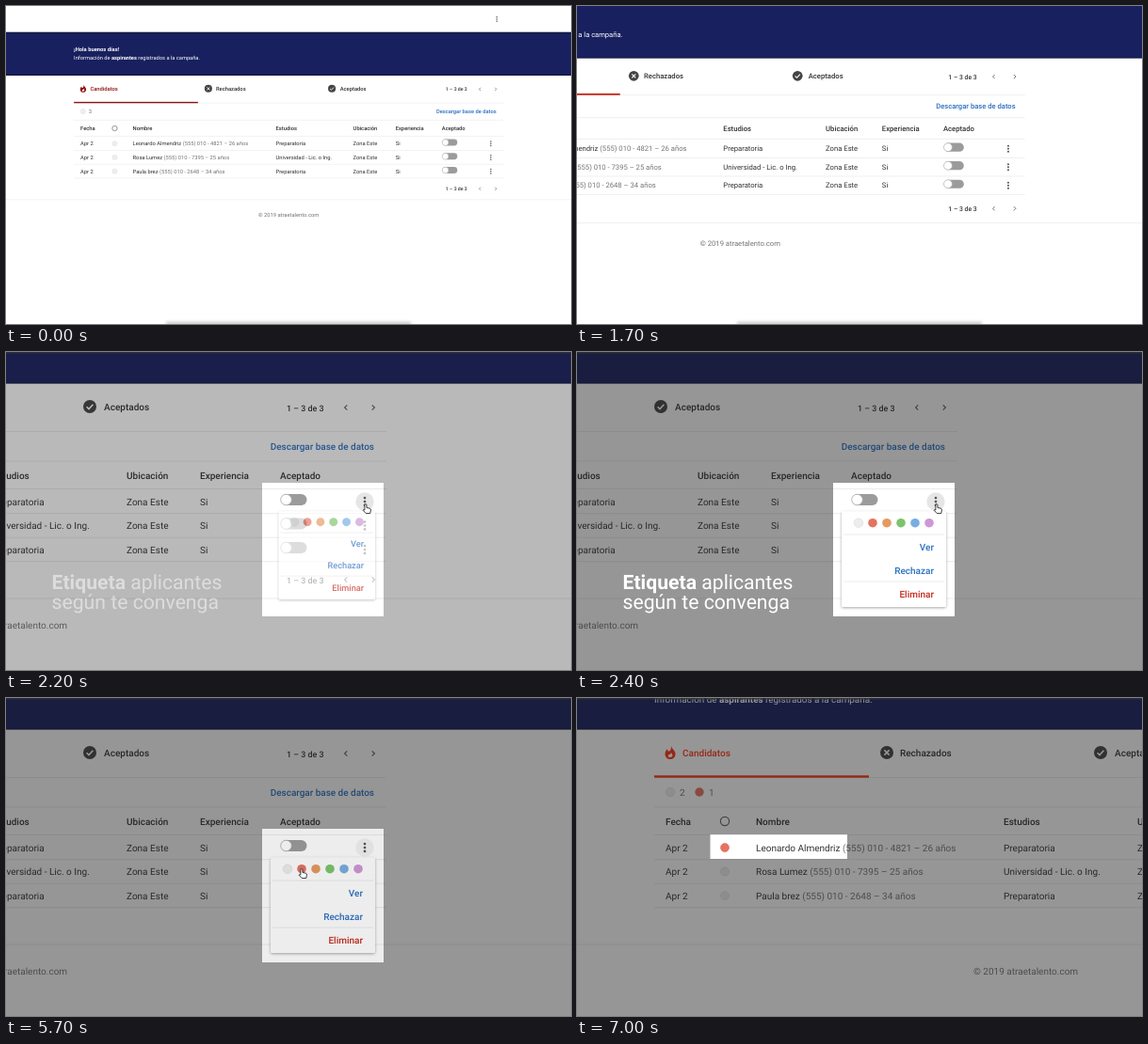
Recreate the animation shown at these times as an HTML page. Size 600 px wide and 338 px high, loop 8 s.

```html
<!DOCTYPE html>
<html lang="es">
<head>
<meta charset="utf-8">
<title>Etiqueta aplicantes</title>
<style>
  html, body { margin: 0; width: 100%; height: 100%; overflow: hidden; background: #fff; }
  svg { display: block; width: 100vw; height: 100vh; font: 10px Roboto, Arial, sans-serif; fill: #333; --red: #c4281b; }
  text { white-space: pre; text-rendering: geometricPrecision; }
  .m { font-weight: 500; }
  .b { font-weight: 700; }
  .soft { fill: #757575; }
  .link { fill: #2a6fc0; }
  .red { fill: var(--red); }
  .line { stroke: #ebebeb; stroke-width: 1; }
  .stroke { fill: none; stroke: #666; stroke-width: 1.2; }
  .blank { fill: #eee; stroke: #dcdcdc; stroke-width: .7; }
</style>
</head>
<body>
<svg id="stage" viewBox="0 0 600 338" xmlns="http://www.w3.org/2000/svg"></svg>
<script>
const LOOP = 8000, STEP = 100, DIM = 0.46, CORAL = '#e57360';
const stage = document.getElementById('stage');

// Markup helpers; the page uses the coordinates of the fully zoomed view.
const text = (x, y, s, cls = '', extra = '') =>
  `<text x="${x}" y="${y + 3.5}" class="${cls}" ${extra}>${s}</text>`;
const line = (y, x1 = 82, x2 = 871) => `<line class="line" x1="${x1}" x2="${x2}" y1="${y}" y2="${y}"/>`;
const circle = (x, y, r, attrs = '') => `<circle cx="${x}" cy="${y}" r="${r}" ${attrs}/>`;
const kebab = (x, y) => [-3.9, 0, 3.9].map(d => circle(x, y + d, 1.35, 'fill="#555"')).join('');
const chevron = (x, y, dir) =>
  `<path class="stroke" d="M${x - dir * 1.3},${y - 2.7}l${dir * 2.7},2.7l${-dir * 2.7},2.7"/>`;
const pager = y => text(765, y, '1 – 3 de 3', 'm', 'font-size="8.9"') + chevron(828, y, -1) + chevron(857, y, 1);
const badge = (x, mark) => circle(x, 58, 7, 'fill="#444"') +
  `<path d="M${x},58${mark}" fill="none" stroke="#fff" stroke-width="1.5"/>`;
const toggle = y => `<rect x="759" y="${y - 6}" width="27.5" height="12" rx="6" fill="#9b9b9b"/>` +
  circle(764.5, y, 5.8, 'fill="#fff" stroke="#a8a8a8" stroke-width=".8"');

const people = [
  { name: 'Leonardo Almendriz', info: '(555) 010 - 4821 – 26 años', studies: 'Preparatoria' },
  { name: 'Rosa Lumez', info: '(555) 010 - 7395 – 25 años', studies: 'Universidad - Lic. o Ing.' },
  { name: 'Paula brez', info: '(555) 010 - 2648 – 34 años', studies: 'Preparatoria' }
];

const row = (p, i) => {
  const y = 159 + i * 25.5;
  return text(94, y, 'Apr 2') + circle(157, y, 4.5, `class="blank" id="tag${i}"`) +
    text(190, y, `${p.name} <tspan class="soft">${p.info}</tspan>`) + text(453, y, p.studies) +
    text(595, y, 'Zona Este') + text(673, y, 'Si') + toggle(y - 2) +
    (i ? '' : circle(848, y, 9.7, 'id="hover" fill="#e6e6e6"')) + kebab(848, y) + line(y + 12.7);
};

const headers = [[94, 'Fecha'], [190, 'Nombre'], [453, 'Estudios'], [595, 'Ubicación'], [673, 'Experiencia'], [758, 'Aceptado']];
const swatches = ['#ededed', CORAL, '#e59a5f', '#7cc46c', '#78aee0', '#cf97d6'];

const menu = `<g id="menu">
  <rect x="748" y="169.5" width="111" height="101.5" rx="2" fill="#fff" filter="url(#shadow)"/>
  ${swatches.map((c, i) => circle(766 + i * 15, 181.7, 4.8, `id="swatch${i}" fill="${c}" ${i ? '' : 'stroke="#ddd" stroke-width=".7"'}`)).join('')}
  ${line(194, 750, 857)}${line(244, 750, 857)}
  ${text(846, 207, 'Ver', 'm link', 'text-anchor="end"')}
  ${text(846, 232, 'Rechazar', 'm link', 'text-anchor="end"')}
  ${text(846, 257.5, 'Eliminar', 'm red', 'text-anchor="end"')}
</g>`;

stage.innerHTML = `
<defs>
  <filter id="shadow" x="-10%" y="-10%" width="120%" height="125%">
    <feDropShadow dx="0" dy="1" stdDeviation="1.6" flood-opacity=".35"/>
  </filter>
  <filter id="soft" x="-10%" y="-200%" width="120%" height="500%"><feGaussianBlur stdDeviation="1.5"/></filter>
</defs>
<rect width="600" height="338" fill="#fff"/>
<g id="page">
  ${kebab(859, -69.7)}
  <rect x="-100" y="-45.5" width="1300" height="78.8" fill="#18205f"/>
  <g id="edges" fill="#10143a">
    <rect x="-100" y="-46" width="1300" height="2"/><rect x="-100" y="32" width="1300" height="2"/>
  </g>
  <g fill="#fff">
    ${text(82, -14.4, '¡Hola buenos días!', 'b')}
    ${text(82, 1, 'Información de <tspan class="b">aspirantes</tspan> registrados a la campaña.', '', 'font-size="9.9"')}
  </g>
  <g transform="translate(99 58)">
    <path class="red" d="M1-7C2-3 6-2 5.5 2C5 6 2.5 7 0 7C-3 7-5.5 5-5.5 1.5C-5.5-1-4-3-3-4C-3-2-2-1-1-1.5C1-2.5 1-5 1-7Z"/>
    <path fill="#fff" d="M1 0C3 2 3 5 0 5C-3 5-2.5 2.5-1 2C.5 1.7 1 1 1 0Z"/>
  </g>
  ${text(112, 58, 'Candidatos', 'm red')}
  ${badge(329, 'm-2.6,-2.6l5.2,5.2m0,-5.2l-5.2,5.2')}${text(343, 58, 'Rechazados', 'm')}
  ${badge(556, 'm-3.4,.2l2.4,2.4l4.4,-4.8')}${text(571, 58, 'Aceptados', 'm')}
  ${pager(59)}
  ${line(84.5)}<rect class="red" x="82" y="82.3" width="228" height="2.4"/>
  ${circle(99, 100, 4.7, 'class="blank"')}
  <text id="untagged" class="soft" x="109" y="103.5"></text>
  <g id="tagged">${circle(130, 100, 4.7, `fill="${CORAL}"`)}${text(140, 100, '1', 'soft')}</g>
  ${text(858, 100, 'Descargar base de datos', 'm link', 'text-anchor="end" font-size="9.95"')}
  ${line(116)}
  ${headers.map(([x, s]) => text(x, 131, s, 'm')).join('')}
  ${circle(157, 131, 4.6, 'class="stroke"')}
  ${line(145.5)}
  ${people.map(row).join('')}
  ${pager(242)}
  ${line(262, -100, 1200)}
  ${text(421, 290, '© 2019 atraetalento.com', 'soft')}
  ${menu}
</g>
<rect id="tray" x="170" y="335.5" width="260" height="5" fill="#bbb" filter="url(#soft)"/>
<g fill="#1c1c1c"><path id="dim" fill-rule="evenodd"/><rect id="spot"/></g>
<rect id="topEdge" width="600" height="1.5" fill="#333"/>
<g id="caption" fill="#fff" font-size="21.2">
  <text x="48.5" y="252"><tspan class="b">Etiqueta</tspan> aplicantes</text>
  <text x="48.5" y="272.5">según te convenga</text>
</g>
<path id="cursor" d="M-1.3 6V.8a1.2 1.2 0 0 1 2.4 0V4l3.8.9q1.6.5 1.4 2l-.8 4.2h-5.2L-3.4 7.2q.4-1.4 2.1-.2Z"
  fill="#fff" stroke="#222" stroke-width="1" stroke-linejoin="round"/>`;

const el = {};
stage.querySelectorAll('[id]').forEach(node => el[node.id] = node);
const set = (id, attrs) => { for (const k in attrs) el[id].setAttribute(k, attrs[k]); };
const fade = (id, value) => set(id, { opacity: value });

const clamp = v => Math.min(1, Math.max(0, v));
const span = (t, from, to) => clamp((t - from) / (to - from));
const mix = (a, b, p) => a + (b - a) * p;
const smooth = p => p * p * (3 - 2 * p);

// Ease-in-out curve with horizontal handles at x1 and x2.
function ease(p, x1, x2) {
  if (p <= 0 || p >= 1) return clamp(p);
  let lo = 0, hi = 1;
  for (let i = 0; i < 24; i++) {
    const s = (lo + hi) / 2, r = 1 - s;
    if (3 * r * r * s * x1 + 3 * r * s * s * x2 + s * s * s < p) lo = s; else hi = s;
  }
  return smooth(lo);
}

function camera(t) {
  const drift = span(t, 0, 1000);
  const zoom = ease(span(t, 1050, 2000), 0.9, 0.66);
  const pan = ease(span(t, 5700, 6600), 0.77, 0.5);
  return {
    k: mix(mix(0.578, 0.585, drift), 1, zoom),
    x: mix(mix(24.7, 21.5, drift), -467, zoom) + 467 * pan,
    y: mix(mix(54.3, 53, drift), 0, zoom)
  };
}

function cursorAt(t) {
  const toDot = smooth(span(t, 4400, 5000)), away = span(t, 5700, 6200);
  return [mix(mix(849, 781, toDot), 809.5, away), mix(mix(162, 182, toDot), 195, away)];
}

function render(t) {
  const cam = camera(t);
  set('page', { transform: `translate(${cam.x} ${cam.y}) scale(${cam.k})` });

  const red = [141, 20, 20].map((v, i) => Math.round(mix(v, [196, 40, 27][i], span(t, 0, 700))));
  stage.style.setProperty('--red', t >= 5800 ? '#ff3212' : `rgb(${red})`);
  fade('edges', 1 - 0.5 * span(t, 0, 700));
  fade('tray', t < 1800 ? 0.7 : 0);

  const open = span(t, 2000, 2300);
  fade('menu', t < 6600 ? open : 0);
  set('menu', { transform: `translate(859 169) scale(${mix(0.7, 1, smooth(open))}) translate(-859 -169)` });
  set('swatch1', { r: 4.8 + 1.2 * Math.sin(Math.PI * span(t, 5100, 5600)) });
  fade('hover', span(t, 1700, 1900) * (1 - 0.5 * span(t, 4400, 4700)));

  const marked = t >= 5700;
  el.untagged.textContent = marked ? '2' : '3';
  fade('tagged', +marked);
  el.tag0.style.fill = el.tag0.style.stroke = marked ? CORAL : '';

  // The shade leaves a window that opens and closes on its own.
  const alpha = DIM * span(t, 1800, 2400);
  const second = t >= 6600;
  const [x, y, w, h] = second ? [141.5, 145, 145.5, 26] : [739 + cam.x, 139, 129, 142];
  const closed = second ? 1 - span(t, 6700, 7000) : span(t, 5600, 6200);
  const whole = closed === 1;
  set('dim', { d: 'M0 0H600V338H0Z' + (whole ? '' : `M${x} ${y}h${w}v${h}h${-w}Z`), opacity: alpha });
  set('spot', { x, y, width: w, height: h, opacity: whole ? 0 : alpha * closed });
  fade('topEdge', 0.8 * span(t, 1700, 2000));

  fade('caption', span(t, 2000, 2400) * (1 - span(t, 4400, 5000)));
  const [cx, cy] = cursorAt(t);
  set('cursor', { transform: `translate(${cx * cam.k + cam.x} ${cy * cam.k + cam.y}) scale(.86)` });
  fade('cursor', t < 6600 ? span(t, 1700, 1900) : 0);
}

const start = performance.now();
function tick() {
  const t = (performance.now() - start) % LOOP;
  render(Math.floor(t / STEP) * STEP);
  requestAnimationFrame(tick);
}
tick();
</script>
</body>
</html>
```
